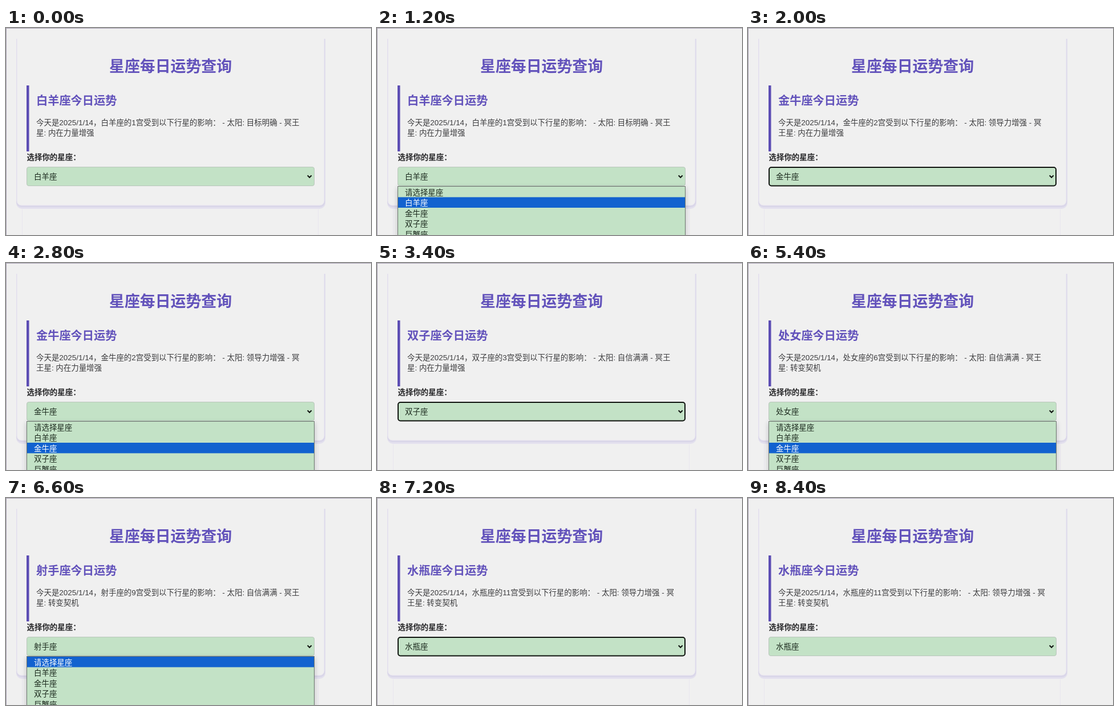
These frames come from a looping animation (640x364 px, 8600 ms). An HTML page with a canvas:

```html
<!DOCTYPE html>
<html lang="zh-CN">
<head>
<meta charset="utf-8">
<title>星座每日运势查询</title>
<style>
  html, body { margin: 0; width: 100%; height: 100%; overflow: hidden; background: #f0f0f0; }
  canvas, svg { position: absolute; left: 0; top: 0; display: block; }
  text {
    font: 13.45px "Liberation Sans", "Noto Sans CJK SC", "Noto Sans CJK", sans-serif;
    fill: #3c3c3e; white-space: pre;
  }
  .title { font-size: 26.9px; }
  .sign { font-size: 20.2px; }
  .title, .sign { font-weight: bold; fill: #6252bb; }
  .label { font-weight: bold; fill: #262628; }
  .field { fill: #1c2a1e; }
</style>
</head>
<body>
<canvas id="stage" width="640" height="364"></canvas>
<svg width="640" height="364" viewBox="0 0 640 364">
  <text class="title" x="181" y="77">星座每日运势查询</text>
  <text class="sign" id="sign" x="53" y="135.3"></text>
  <text id="line1" x="53" y="171"></text>
  <text id="line2" x="53" y="189"></text>
  <text class="label" x="36.5" y="232">选择你的星座：</text>
  <text class="field" id="value" x="49" y="266"></text>
  <g id="options"></g>
</svg>
<script>
const LOOP = 8600;
const ROW = 18.5, LIST_TOP = 279;
const OPTIONS = ['请选择星座', '白羊座', '金牛座', '双子座', '巨蟹座'];
const OFFSCREEN = 9;

// name, house, sun, pluto
const SIGNS = {
  aries: ['白羊座', 1, '目标明确', '内在力量增强'],
  taurus: ['金牛座', 2, '领导力增强', '内在力量增强'],
  gemini: ['双子座', 3, '自信满满', '内在力量增强'],
  virgo: ['处女座', 6, '自信满满', '转变契机'],
  sagittarius: ['射手座', 9, '自信满满', '转变契机'],
  aquarius: ['水瓶座', 11, '领导力增强', '转变契机']
};

// start time, sign, mode: 'idle', 'focus' or the hovered row of the open list
const STEPS = [
  [0, 'aries', 'idle'],
  [1000, 'aries', 0], [1200, 'aries', 1], [1400, 'aries', 2],
  [2000, 'taurus', 'focus'],
  [2400, 'taurus', 0], [2600, 'taurus', 1], [2800, 'taurus', 2], [3000, 'taurus', 3],
  [3400, 'gemini', 'focus'],
  [4000, 'gemini', 3], [4200, 'gemini', OFFSCREEN],
  [4800, 'virgo', 'focus'],
  [5400, 'virgo', 2], [5600, 'virgo', OFFSCREEN],
  [6000, 'sagittarius', 'focus'],
  [6600, 'sagittarius', 0], [6800, 'sagittarius', OFFSCREEN],
  [7200, 'aquarius', 'focus'],
  [8400, 'aquarius', 'idle']
];

const byId = id => document.getElementById(id);
const ctx = byId('stage').getContext('2d');
const optionTexts = OPTIONS.map((name, i) => {
  const el = document.createElementNS('http://www.w3.org/2000/svg', 'text');
  el.setAttribute('x', 49);
  el.setAttribute('y', LIST_TOP + ROW * i + 14.8);
  el.textContent = name;
  byId('options').append(el);
  return el;
});

function rect(color, x, y, w, h) {
  ctx.fillStyle = color;
  ctx.fillRect(x, y, w, h);
}

function roundBox(x, y, w, h, r, fill, stroke, width) {
  ctx.beginPath();
  ctx.roundRect(x, y, w, h, r);
  if (fill) {
    ctx.fillStyle = fill;
    ctx.fill();
  }
  if (stroke) {
    ctx.strokeStyle = stroke;
    ctx.lineWidth = width;
    ctx.stroke();
  }
}

function drawPage() {
  rect('#f0f0f0', 0, 0, 640, 364);

  // edges of the lower card
  rect('#e9e6ef', 28, 319, 1, 45);
  rect('#e9e6ef', 547, 319, 1, 45);

  // upper card with its soft shadow
  ctx.save();
  ctx.beginPath();
  ctx.rect(0, 19, 640, 345);
  ctx.clip();
  roundBox(18, -20, 542, 338, 10, '#e3e0ee');
  roundBox(18, -20, 541.5, 335, 9, '#d9d6e8');
  roundBox(19, -20, 539, 332, 8, '#f0f0f0', '#e6e2f0', 1);
  ctx.restore();

  rect('#5c4db4', 36, 101, 4.5, 116);
  rect('#aaa2b4', 0, 0, 640, 1);
  rect('#aaa2b4', 0, 0, 1, 364);
}

function drawSelect(focused) {
  if (focused) roundBox(37, 245, 503, 32.5, 4, '#c3e2c6', '#101410', 2);
  else roundBox(36.5, 244.5, 504, 33, 3.5, '#c3e2c6', '#b9c6bb', 1);
  ctx.beginPath();
  ctx.moveTo(528.7, 259.2);
  ctx.lineTo(532.2, 262.8);
  ctx.lineTo(535.7, 259.2);
  ctx.strokeStyle = '#101410';
  ctx.lineWidth = 2;
  ctx.stroke();
}

function drawList(hover) {
  ctx.save();
  ctx.shadowColor = 'rgba(60, 60, 80, 0.3)';
  ctx.shadowBlur = 8;
  ctx.shadowOffsetY = 3;
  rect('#6d776f', 36, 278, 505, 120);
  ctx.restore();
  rect('#c3e2c6', 37, LIST_TOP, 503, 120);
  rect('#1262cf', 37, LIST_TOP + ROW * hover, 503, ROW);
}

function setTexts([name, house, sun, pluto]) {
  const split = sun.length > 4 ? 1 : 2;
  const planet = '冥王星';
  byId('sign').textContent = name + '今日运势';
  byId('line1').textContent =
    `今天是2025/1/14，${name}的${house}宫受到以下行星的影响： - 太阳: ${sun} - ${planet.slice(0, split)}`;
  byId('line2').textContent = `${planet.slice(split)}: ${pluto}`;
  byId('value').textContent = name;
}

function show([, sign, mode]) {
  const open = typeof mode === 'number';
  drawPage();
  drawSelect(mode === 'focus');
  if (open) drawList(mode);
  setTexts(SIGNS[sign]);
  byId('options').style.display = open ? '' : 'none';
  optionTexts.forEach((el, i) => { el.style.fill = i === mode ? '#fff' : '#1c2a1e'; });
}

let current;
function tick() {
  const t = performance.now() % LOOP;
  const step = STEPS.findLast(([start]) => start <= t);
  if (step !== current) show(current = step);
  requestAnimationFrame(tick);
}
tick();
</script>
</body>
</html>
```
